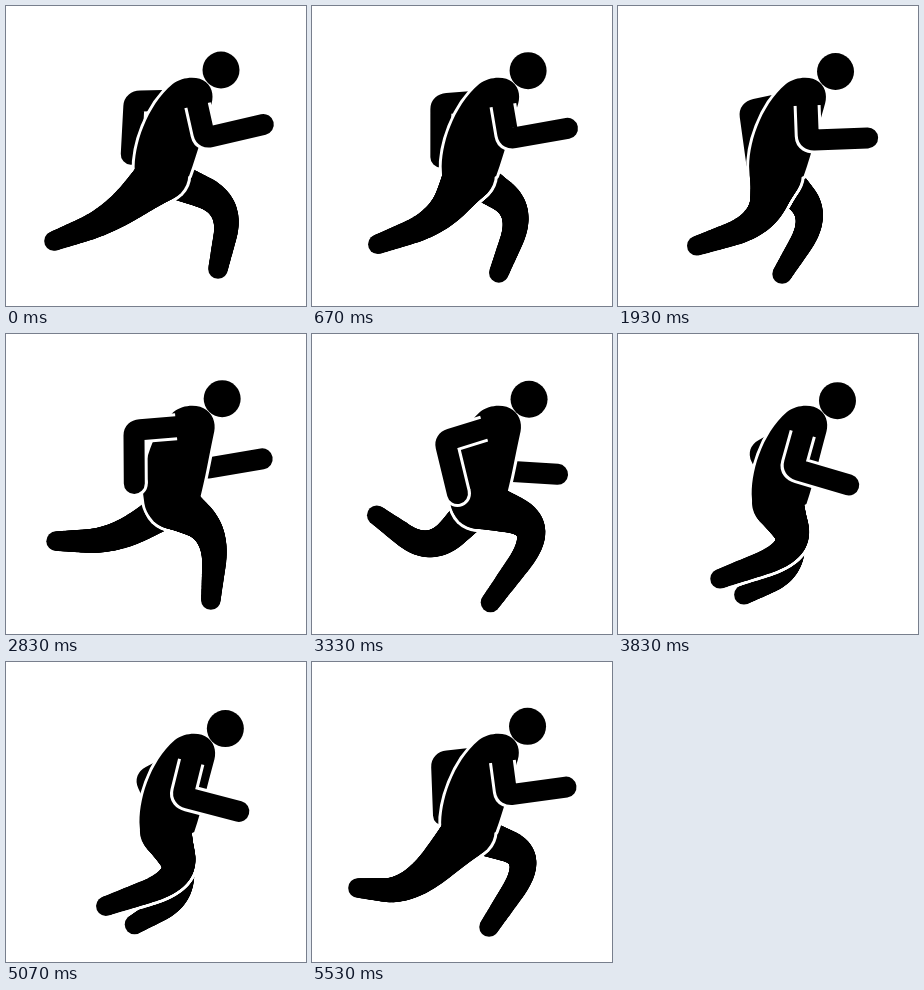
Write an HTML page with a canvas that moves like this. It is 300 by 300 pixels and loops after 5560 ms.

```html
<!DOCTYPE html>
<html lang="en">
<head>
<meta charset="utf-8">
<title>Running figure</title>
<style>
  html, body { margin: 0; width: 100%; height: 100%; overflow: hidden; background: #fff; }
  canvas { display: block; width: 300px; height: 300px; }
</style>
</head>
<body>
<canvas id="stage"></canvas>
<script>
const SIZE = 300, LOOP = 5560, STEPS = 167, STRIDES = 9;
const STEP_MS = 100 / 3, GAP = 3, ARM = 21, TURN = 2 * Math.PI;
const canvas = document.getElementById('stage');
const ctx = canvas.getContext('2d');
const dpr = window.devicePixelRatio || 1;
canvas.width = canvas.height = SIZE * dpr;
ctx.scale(dpr, dpr);
ctx.lineJoin = 'round';

// Key poses of a stride: phase, knee x y, foot x y
const nearLeg = [
  [0, 104, 214, 48, 235], [.13, 146, 218, 80, 240], [.2, 184, 215, 103, 245],
  [.38, 234, 192, 176, 268], [.58, 211, 198, 205, 266], [.74, 174, 232, 112, 260],
  [.946, 98, 230, 46, 226]
];
const farLeg = [
  [.08, 108, 207, 50, 207], [.27, 172, 218, 112, 252], [.446, 224, 194, 177, 265],
  [.5, 226, 198, 212, 263], [.626, 200, 210, 164, 268], [.7, 176, 234, 125, 260],
  [.883, 120, 221, 66, 182]
];

const torso = new Path2D(
  'M168 78C178 70 194 70 201 76C209 82 210 92 207 101C202 120 197 145 189 170' +
  'L150 190C140 185 135 178 134.5 165C132 140 143 100 168 78Z');

const frac = x => x - Math.floor(x);
const mix = (a, b, t) => a + (b - a) * t;
const between = (p, q, t) => [mix(p[0], q[0], t), mix(p[1], q[1], t)];
const reach = ([x, y], degrees, length) => {
  const a = degrees / 360 * TURN;
  return [x + length * Math.sin(a), y + length * Math.cos(a)];
};

// Smooth periodic interpolation between key poses
function legPose(keys, phase) {
  const n = keys.length;
  const p = frac(phase);
  const i = keys.filter(k => k[0] <= p).length - 1;
  const key = k => keys[(k + n) % n];
  const time = k => key(k)[0] + Math.floor(k / n);
  const t0 = time(i), dt = time(i + 1) - t0, u = (p - t0) / dt;
  const [kx, ky, fx, fy] = [1, 2, 3, 4].map(c => {
    const a = key(i)[c], b = key(i + 1)[c], d = b - a;
    const ma = (b - key(i - 1)[c]) / (time(i + 1) - time(i - 1)) * dt;
    const mb = (key(i + 2)[c] - a) / (time(i + 2) - t0) * dt;
    return a + u * (ma + u * (3 * d - 2 * ma - mb + u * (ma + mb - 2 * d)));
  });
  return [[kx, ky], [fx, fy]];
}

// Pendulum swing: 1 fully forward, -1 fully back
function armPose(phase, dx, dy) {
  const w = Math.cos(TURN * (phase - .02));
  const shoulder = [184.5 + 5.5 * w + dx, 92 + dy];
  const elbow = reach(shoulder, -38 + 51 * w, 46.5 - 5.5 * w);
  const hand = reach(elbow, 50 + 53.5 * w, 56.5 + 3.5 * w);
  return [shoulder, elbow, hand];
}

function strokeArm([start, elbow, hand], width, cap) {
  ctx.lineCap = cap;
  ctx.lineWidth = width;
  ctx.beginPath();
  ctx.moveTo(...start);
  ctx.lineTo(...between(elbow, start, .12));
  ctx.quadraticCurveTo(...elbow, ...between(elbow, hand, .1));
  ctx.lineTo(...hand);
  ctx.stroke();
}

function disc([x, y], r) {
  ctx.beginPath();
  ctx.arc(x, y, r, 0, TURN);
  ctx.fill();
}

// Tapered limb from hip to foot with a rounded knee
function leg(hip, [knee, foot], thick, grow) {
  const bend = .5, N = 90;
  const a = between(knee, hip, bend), b = between(knee, foot, bend);
  const spine = t => {
    if (t < .25) return between(hip, a, t * 4);
    if (t > .75) return between(b, foot, t * 4 - 3);
    const u = t * 2 - .5;
    return between(between(a, knee, u), between(knee, b, u), u);
  };
  for (let i = 0; i <= N; i++) {
    const s = 1 - i / N;
    disc(spine(i / N), 9.8 + 7 * s + thick * s ** 3 + grow);
  }
}

function paint(color) {
  ctx.fillStyle = ctx.strokeStyle = color;
}

function draw(phase) {
  const bob = Math.cos(2 * TURN * phase);
  const swing = Math.cos(TURN * phase);
  const hip = [161.5 - 5 * swing, 169];
  const thigh = legPose(nearLeg, phase);
  const arm = armPose(phase, 0, 0);
  const [shoulder, elbow, hand] = arm;

  paint('#fff');
  ctx.fillRect(0, 0, SIZE, SIZE);

  paint('#000');
  strokeArm(armPose(phase + .5, 1, 2), ARM, 'round');
  leg([165, 173], legPose(farLeg, phase + .5), 2, 0);

  // The torso leans about the shoulders; a white rim parts it from the far limbs
  const lean = -.05 * swing;
  for (const [color, grow] of [['#fff', GAP], ['#000', 0]]) {
    paint(color);
    ctx.save();
    ctx.transform(1, 0, lean, 1, -75 * lean - 1.2 * bob, 0);
    ctx.fill(torso);
    if (grow) {
      ctx.lineWidth = 2 * grow;
      ctx.stroke(torso);
    }
    ctx.restore();
    leg(hip, thigh, 9, grow);
  }

  // The seam stops short of the shoulder, so the arm stays joined there
  paint('#fff');
  const seam = ARM + 2 * GAP;
  strokeArm([between(shoulder, elbow, .18), elbow, hand], seam, 'butt');
  disc(hand, seam / 2);
  paint('#000');
  strokeArm(arm, ARM, 'round');

  disc([217.5 - 2.5 * bob, 65.5 - 1.5 * bob], 18.5);
}

const start = performance.now();
function tick() {
  const t = (performance.now() - start) % LOOP;
  const step = Math.floor((t + 5) / STEP_MS) % STEPS;
  draw(frac(step * STRIDES / STEPS));
  requestAnimationFrame(tick);
}
tick();
</script>
</body>
</html>
```
